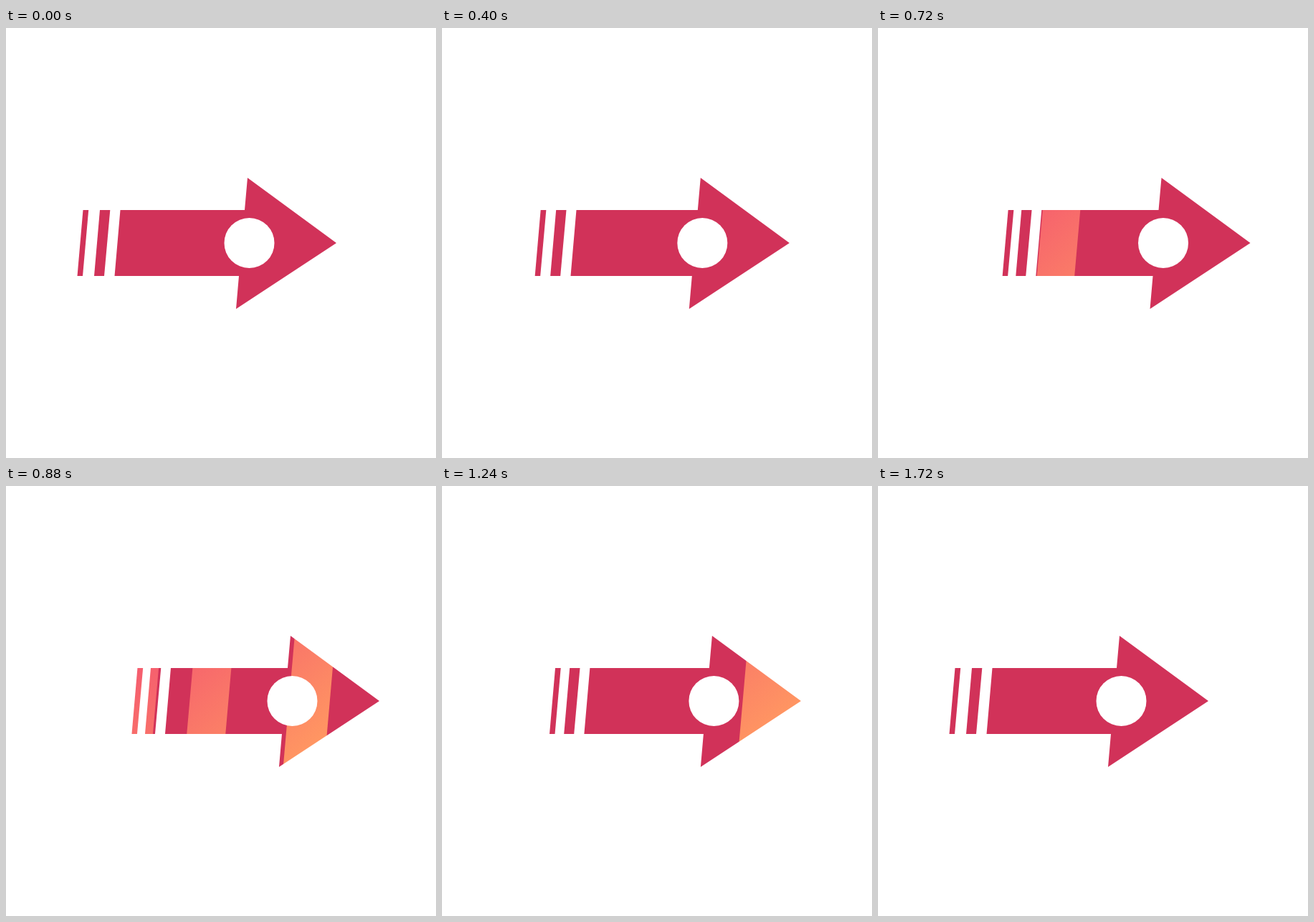
Write an HTML page with a canvas that moves like this. It is 600 by 600 pixels and loops after 1760 ms.

```html
<!DOCTYPE html>
<html lang="en">
<head>
<meta charset="utf-8">
<title>Arrow</title>
<style>
  html, body { margin: 0; width: 100%; height: 100%; overflow: hidden; background: #fff; }
  canvas { display: block; }
</style>
</head>
<body>
<canvas id="stage" width="600" height="600"></canvas>
<script>
const ctx = document.getElementById('stage').getContext('2d');
const LOOP = 1760, STEP = 40, SWING = 860, SWEEP = 1650;
const SLANT = -0.088; // horizontal drift per pixel down, shared by all slanted edges

const glow = ctx.createLinearGradient(240, 210, 390, 390);
glow.addColorStop(0, '#f55d6e');
glow.addColorStop(1, '#ff9562');

// Arrow pieces at rest; travel is how far each one moves to the right.
const pieces = [
  { travel: 76, points: [[107.5, 254], [115.2, 254], [107, 346], [99.5, 346]] },
  { travel: 71, points: [[131, 254], [145.3, 254], [137, 346], [123, 346]] }
];
const tail = { travel: 70.5, top: 159.5, bottom: 151.5 };
const HEAD_TRAVEL = 60;

// Light bands: [start, distance] of the left and right edge at y = 300.
const bands = [
  { left: [-278, 752], right: [-281, 897] },
  { left: [-214, 861], right: [-160, 861] },
  { left: [44.7, 641], right: [92.4, 658] }
];

// Ease curve with flat ends, like cubic-bezier(x1, 0, x2, 1).
function ease(u, x1, x2) {
  u = Math.min(1, Math.max(0, u));
  let low = 0, high = 1;
  for (let i = 0; i < 24; i++) {
    const s = (low + high) / 2, r = 1 - s;
    const x = 3 * r * r * s * x1 + 3 * r * s * s * x2 + s * s * s;
    if (x < u) low = s; else high = s;
  }
  return low * low * (3 - 2 * low);
}

function polygon(points, color) {
  ctx.beginPath();
  points.forEach(([x, y]) => ctx.lineTo(x, y));
  ctx.closePath();
  ctx.fillStyle = color;
  ctx.fill();
}

function drawArrow(shift) {
  const crimson = '#d13259';
  for (const { travel, points } of pieces) {
    polygon(points.map(([x, y]) => [x + travel * shift, y]), crimson);
  }
  const back = tail.travel * shift, front = HEAD_TRAVEL * shift;
  polygon([
    [tail.top + back, 254], [333 + front, 254], [337 + front, 209], [461 + front, 300],
    [321 + front, 392], [325 + front, 346], [tail.bottom + back, 346]
  ], crimson);
}

function drawBands(progress) {
  ctx.globalCompositeOperation = 'source-atop';
  const lean = 100 * SLANT;
  for (const { left, right } of bands) {
    const [a, b] = [left, right].map(([start, distance]) => start + distance * progress);
    polygon([[a - lean, 200], [b - lean, 200], [b + lean, 400], [a + lean, 400]], glow);
  }
  ctx.globalCompositeOperation = 'source-over';
}

function drawBadge(shift) {
  ctx.beginPath();
  ctx.arc(339.5 + HEAD_TRAVEL * shift, 300, 35, 0, Math.PI * 2);
  ctx.fillStyle = '#fff';
  ctx.fill();
}

function render(now) {
  const t = Math.floor((now % LOOP) / STEP) * STEP;
  const swing = t < SWING ? t / SWING : 2 - t / SWING;
  const shift = ease(swing, 0.67, 0.33);
  ctx.clearRect(0, 0, 600, 600);
  drawArrow(shift);
  drawBands(ease(t / SWEEP, 0.697, 0.3515));
  drawBadge(shift);
}

const began = performance.now();
function tick() {
  render(performance.now() - began);
  requestAnimationFrame(tick);
}
tick();
</script>
</body>
</html>
```
